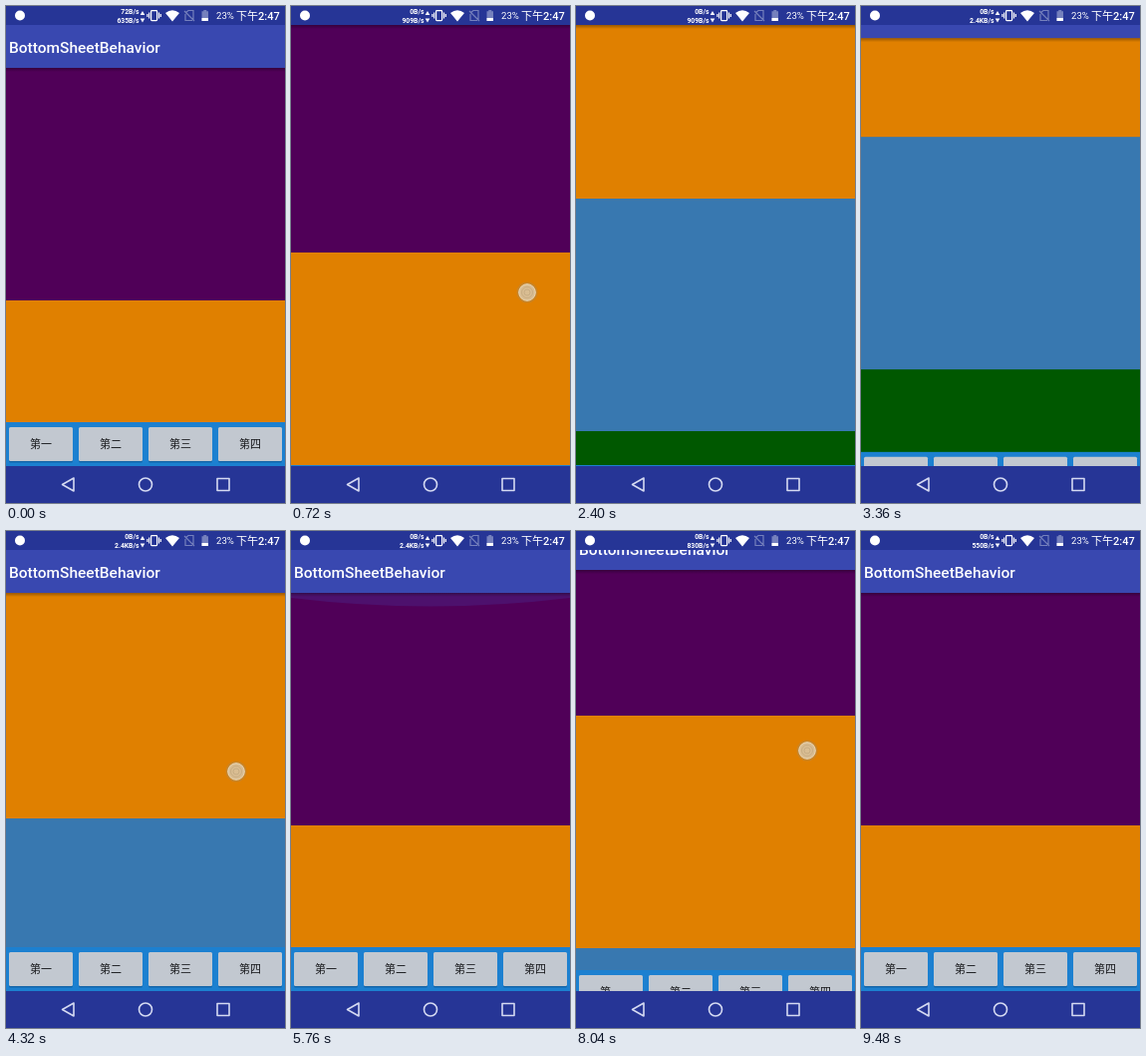
Animation of 280 by 498 pixels, one loop 9600 ms. Source, as an HTML page:

```html
<!DOCTYPE html>
<html lang="zh">
<head>
<meta charset="utf-8">
<style>
  html, body { margin: 0; width: 100%; height: 100%; overflow: hidden; background: #263596; }
  svg { display: block; width: 100vw; height: 100vh; }
  text { font-family: Roboto, "Noto Sans CJK SC", "Noto Sans CJK", sans-serif; fill: #fff; }
  .speed { font-size: 6.8px; font-weight: 600; text-anchor: end; }
  .button text { font-size: 11px; font-weight: 500; fill: #18191c; text-anchor: middle; }
  .line { fill: none; stroke: #d5daf2; stroke-width: 1.6; stroke-linejoin: round; }
</style>
</head>
<body>
<svg viewBox="0 0 280 498">
  <defs>
    <linearGradient id="shade" x2="0" y2="1">
      <stop stop-opacity=".32"/><stop offset="1" stop-opacity="0"/>
    </linearGradient>
    <clipPath id="view"><rect y="19" width="280" height="442"/></clipPath>
  </defs>

  <g clip-path="url(#view)">
    <g id="page">
      <rect width="280" height="234" fill="#500058"/>
      <rect y="233" width="280" height="234" fill="#e08000"/>
      <rect y="466" width="280" height="234" fill="#3878b0"/>
      <rect y="699" width="280" height="234" fill="#005800"/>
    </g>
    <path id="glow" d="M0 62H280V67Q140 84 0 67Z" fill="#4058c0"/>
    <g id="toolbar">
      <rect y="62" width="280" height="4" fill="url(#shade)"/>
      <rect y="19" width="280" height="43" fill="#3948b0"/>
      <text x="3" y="47" font-size="15.5" font-weight="500">BottomSheetBehavior</text>
    </g>
    <g id="bar"><rect y="417" width="280" height="44" fill="#1c80d0"/></g>
  </g>

  <rect width="280" height="19" fill="#263596"/>
  <circle cx="14" cy="9.5" r="5" fill="#fff"/>
  <text class="speed" id="up" x="133.5" y="8"></text>
  <text class="speed" id="down" x="133.5" y="17.3"></text>
  <path d="M134.7 9L137 5L139.3 9ZM134.7 12.5H139.3L137 16.5Z" fill="#fff"/>
  <g fill="none" stroke="#fff" stroke-width="1.2">
    <rect x="145.6" y="4.6" width="6" height="10" rx=".8"/>
    <path d="M143.7 6.5V12.5M141.9 8V11M153.5 6.5V12.5M155.3 8V11"/>
  </g>
  <path d="M160 7Q167 1.5 174 7L167 15.5Z" fill="#fff"/>
  <path d="M180 7L183 4.5H188V14M180 8V14.5H187M179 5L189 15" fill="none" stroke="#7580bd" stroke-width="1.2"/>
  <path d="M196.5 5.3H198.3V4H201.3V5.3H203V15H196.5Z" fill="#7580bd"/>
  <rect x="196.5" y="12" width="6.5" height="3" fill="#fff"/>
  <text x="211" y="13" font-size="9.6">23%</text>
  <text x="231" y="13.5" font-size="11" font-weight="500">下午2:47</text>

  <rect y="461" width="280" height="37" fill="#263596"/>
  <path class="line" d="M68 473V486L56.5 479.5Z"/>
  <circle class="line" cx="140" cy="479.5" r="6.5"/>
  <rect class="line" x="212" y="473.5" width="12" height="12"/>

  <g id="finger">
    <circle r="10.5" fill="#a88a60" opacity=".4"/>
    <circle r="8.3" fill="#d9bd92" stroke="#e8d8bc"/>
    <circle r="5.5" fill="none" stroke="#c3a981" stroke-width=".8"/>
    <circle r="3" fill="none" stroke="#c3a981" stroke-width=".8"/>
  </g>
</svg>
<script>
const LOOP = 9600, STEP = 120, BAR = 43;
const el = id => document.getElementById(id);

// [time, distance dragged]
const scrollKeys = [[0, 0], [120, 0], [720, 48], [1440, 130], [2400, 335], [3120, 410], [3600, 370],
  [4320, 240], [5400, 0], [6480, 0], [6960, 41], [7560, 130], [8040, 110], [8760, 0], [LOOP, 0]];
// The finger travels with the page: y = anchor - distance
const drags = [
  { from: 120, to: 1800, x: 237, anchor: 335 },
  { from: 2520, to: 3120, x: 235, anchor: 675 },
  { from: 3480, to: 4560, x: 231, anchor: 481 },
  { from: 6480, to: 7440, x: 234, anchor: 384 },
  { from: 7800, to: 8400, x: 232, anchor: 330 }
];
const speeds = [[0, '72B/s', '635B/s'], [240, '0B/s', '909B/s'], [3240, '0B/s', '2.4KB/s'],
  [6240, '0B/s', '1.4KB/s'], [7740, '0B/s', '830B/s'], [9480, '0B/s', '550B/s']];

['第一', '第二', '第三', '第四'].forEach((label, i) => {
  el('bar').innerHTML += `<g class="button" transform="translate(${3 + i * 70} 422)">
    <rect y="1" width="64" height="34.5" rx="1.5" fill="#0d4b82" opacity=".5"/>
    <rect width="64" height="34" rx="1.5" fill="#c2c8d0"/>
    <text x="32" y="21">${label}</text></g>`;
});

const rate = i => (scrollKeys[i + 1][1] - scrollKeys[i][1]) / (scrollKeys[i + 1][0] - scrollKeys[i][0]);

function slope(i) {
  if (i === 0 || i === scrollKeys.length - 1) return 0;
  const a = rate(i - 1), b = rate(i);
  return a * b > 0 ? 2 * a * b / (a + b) : 0;
}

// Monotone cubic through the scroll keys
function distance(t) {
  const i = scrollKeys.findIndex((key, k) => t < scrollKeys[k + 1][0]);
  const [t0, a] = scrollKeys[i], [t1, b] = scrollKeys[i + 1];
  const d = t1 - t0, u = (t - t0) / d, v = 1 - u;
  return a * v * v * (1 + 2 * u) + b * u * u * (3 - 2 * u)
    + d * u * v * (slope(i) * v - slope(i + 1) * u);
}

// Bars hide on scrolling up and return as soon as the page moves down
function barShift(t) {
  let shift = 0, last = 0;
  for (let s = 0; s <= t; s += STEP) {
    const now = distance(s);
    shift = Math.min(BAR, Math.max(0, shift + now - last));
    last = now;
  }
  return shift;
}

const moveY = (id, y) => el(id).setAttribute('transform', `translate(0 ${y.toFixed(2)})`);

function draw(t) {
  const scrolled = distance(t), shift = barShift(t);
  moveY('page', 62 - scrolled);
  moveY('toolbar', -shift);
  moveY('bar', shift);

  const glow = t >= 5280 && t < 6000 ? Math.min(1, (t - 5160) / 240, (6120 - t) / 360) : 0;
  el('glow').setAttribute('opacity', glow * 0.2);

  const drag = drags.find(d => t >= d.from && t < d.to);
  el('finger').style.display = drag ? '' : 'none';
  if (drag) el('finger').setAttribute('transform', `translate(${drag.x} ${drag.anchor - scrolled})`);

  const [, up, down] = speeds.filter(s => s[0] <= t).pop();
  el('up').textContent = up;
  el('down').textContent = down;
}

function frame() {
  draw(Math.floor(performance.now() % LOOP / STEP) * STEP);
  requestAnimationFrame(frame);
}
frame();
</script>
</body>
</html>
```
